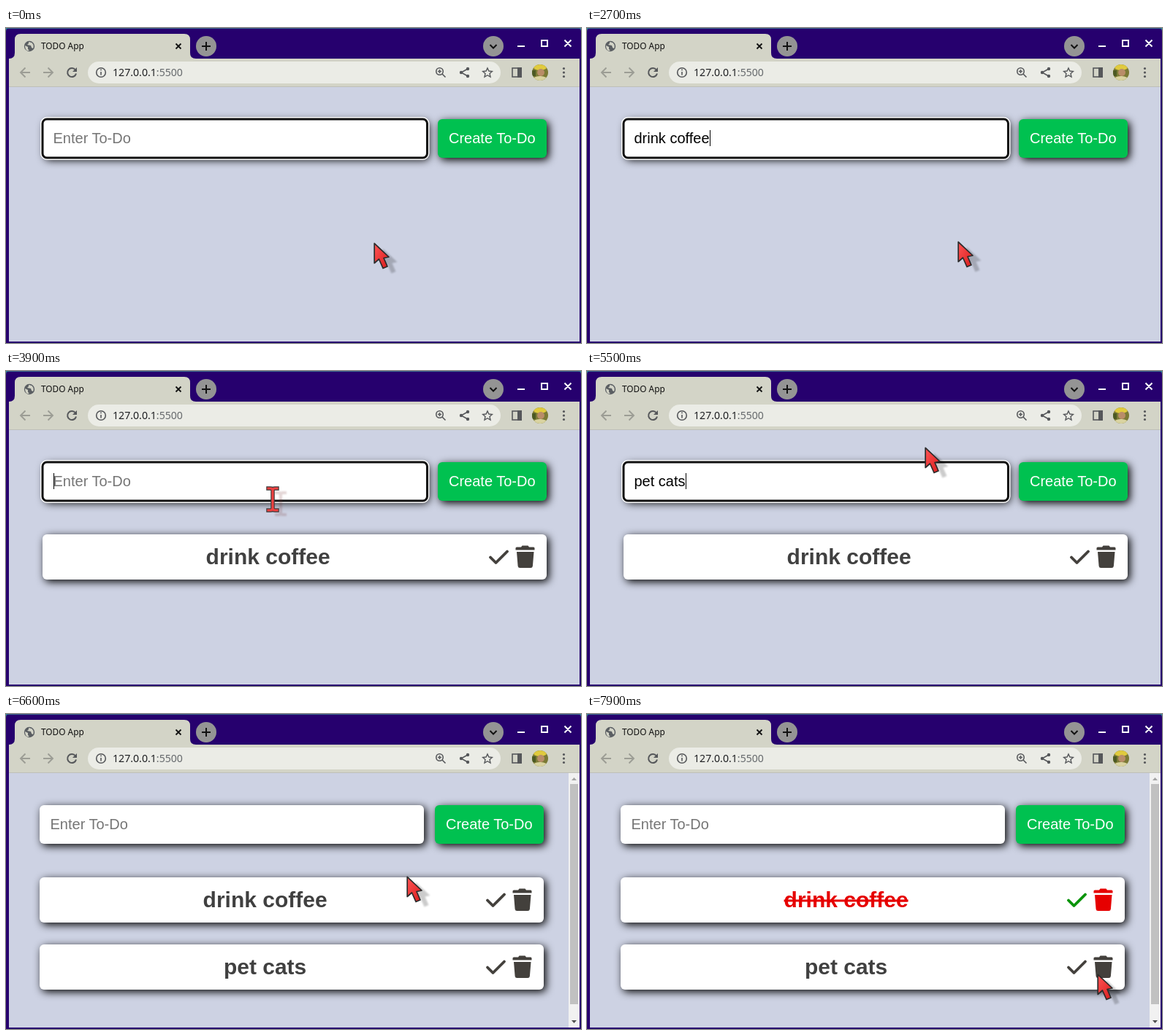
An HTML page that plays this animation: 787x432 px, repeating every 8 s.

```html
<!DOCTYPE html>
<html lang="en">
<head>
<meta charset="utf-8">
<title>TODO App</title>
<style>
  html, body { margin: 0; width: 100%; height: 100%; overflow: hidden; background: #26006e; }
  svg { display: block; width: 787px; height: 432px; }
  text { white-space: pre; }
  .ui { font-family: "Noto Sans", sans-serif; }
  .page { font: 20px "Liberation Sans", Arial, sans-serif; }
  .card { filter: drop-shadow(3px 3px 6px #000); }
  .line { fill: none; stroke: #55575a; stroke-width: 1.6; }
  .item { --text: #404040; --check: #43403c; --trash: #43403c; }
  .item text { font-weight: bold; font-size: 30px; text-anchor: middle; fill: var(--text); }
  .item .check { fill: none; stroke: var(--check); stroke-width: 3.8; stroke-linecap: round; stroke-linejoin: round; }
  .item .trash { fill: var(--trash); }
  .item.done { --text: #e60000; --check: #0a940a; --trash: #e60000; }
  .item.done text { text-decoration: line-through; }
  .shadow { opacity: .2; filter: blur(1px); }
</style>
</head>
<body>
<svg viewBox="0 0 787 432">
  <defs>
    <linearGradient id="red" x2="1" y2="1">
      <stop stop-color="#f55"/><stop offset="1" stop-color="#d81c1c"/>
    </linearGradient>
    <path id="arrowShape" d="M.2 .4V27.500L6.500 22L12 34.500L18 32L13 20.500L20 19Z" stroke-linejoin="round"/>
    <path id="beamShape" d="M-6-15H-3Q0-15 0-12V12Q0 15-3 15H-6M6-15H3Q0-15 0-12V12Q0 15 3 15H6" fill="none" stroke-linecap="square"/>
    <clipPath id="avatar"><circle cx="731" cy="61" r="11"/></clipPath>
  </defs>

  <!-- window frame -->
  <rect width="787" height="432" fill="#26006e"/>
  <path d="M0 .5H787" stroke="#3c6a8c"/>
  <path d="M0 0H5Q0 0 0 5zM787 0H782Q787 0 787 5z" fill="#2a8a9a"/>
  <path d="M4 81V42Q12 42 12 34V16Q12 8 20 8H244Q252 8 252 16V34Q252 42 260 42H785V81Z" fill="#d3d4c7"/>
  <rect x="4" y="80" width="781" height="1" fill="#bfc0b9"/>
  <g class="ui">
    <text x="48" y="29" font-size="11.850" fill="#111">TODO App</text>
    <rect x="112" y="46" width="565" height="30" rx="15" fill="#ebece6"/>
    <text x="146" y="66" font-size="14.130" fill="#202124">127.0.0.1<tspan fill="#666a6d">:5500</tspan></text>
  </g>
  <circle cx="32" cy="25" r="7.2" fill="#5a5e62"/>
  <path d="M26 24L30 26V29L32 31L29 31Q26 29 26 24M31 19V21L29 23L34 24L35 27L37 28Q39 23 35 20Z" fill="#d3d4c7"/>
  <path d="M232.500 21.500l7 7m0-7l-7 7" fill="none" stroke="#111" stroke-width="1.8"/>
  <circle cx="274" cy="25" r="14" fill="#949494"/>
  <circle cx="667" cy="25" r="14" fill="#949494"/>
  <path d="M268 25h12m-6-6v12M662.500 23l4.500 4.500 4.500-4.500" fill="none" stroke="#111" stroke-width="2"/>
  <path d="M700 25h10M733 17h8v8h-8zM764.500 16.500l9 9m0-9l-9 9" fill="none" stroke="#fff" stroke-width="2"/>

  <!-- toolbar icons -->
  <path class="line" d="M33 61H20m6.500-6.500L20 61l6.500 6.500M51 61h13m-6.500-6.500L64 61l-6.500 6.500" style="stroke:#9c9d95;stroke-width:1.9"/>
  <path class="line" d="M95 57.500A6 6 0 1 0 96 62.500" style="stroke-width:2"/>
  <path d="M97 54v6h-6z" fill="#55575a"/>
  <circle class="line" cx="130" cy="61" r="6.300"/>
  <path class="line" d="M130 60v4.500m0-8v1.800"/>
  <circle class="line" cx="593.500" cy="59.500" r="4.700"/>
  <path class="line" d="M597 63l4.500 4.500M591 59.500h5m-2.500-2.500v5"/>
  <path class="line" d="M632 56l-9 5 9 5"/>
  <g fill="#55575a">
    <circle cx="632" cy="56" r="2.200"/><circle cx="623" cy="61" r="2.200"/><circle cx="632" cy="66" r="2.200"/>
    <circle cx="763.500" cy="55.500" r="1.600"/><circle cx="763.500" cy="61" r="1.600"/><circle cx="763.500" cy="66.500" r="1.600"/>
    <path d="M700 54h6v14h-6z"/>
  </g>
  <path class="line" d="M659 55l1.900 4 4.500.5-3.400 3 1 4.500-4-2.300-4 2.300 1-4.500-3.400-3 4.500-.5z" style="stroke-width:1.4"/>
  <rect class="line" x="693" y="55" width="12" height="12"/>
  <g clip-path="url(#avatar)">
    <path d="M719 49h24v24h-24z" fill="#7b7a35"/>
    <ellipse cx="731" cy="54" rx="9" ry="4" fill="#e0ca3e"/>
    <circle cx="732" cy="61" r="5" fill="#b98d68"/>
    <path d="M720 73Q722 65 732 66T743 73z" fill="#d9d3a0"/>
    <path d="M719 58h6v8h-6z" fill="#4c5a24"/>
  </g>

  <!-- page -->
  <rect x="4" y="81" width="781" height="349" fill="#cdd2e3"/>
  <g id="page" class="page">
    <rect class="card" x="50" y="125" width="526" height="53" rx="6" fill="#fff"/>
    <g id="ring" fill="#fff">
      <rect x="50" y="125" width="526.500" height="53" rx="6" stroke="#fff" stroke-width="6"/>
      <rect x="50" y="125" width="526.500" height="53" rx="6" stroke="#101010" stroke-width="3"/>
    </g>
    <text id="field" x="64.500" y="158"></text>
    <rect id="caret" y="140" width="1" height="22"/>
    <rect id="button" class="card" x="591" y="125" width="149" height="53" rx="6"/>
    <text x="606" y="158" fill="#fff">Create To-Do</text>
    <g id="items"></g>
  </g>
  <g id="scrollbar">
    <path d="M770 81h15v349h-15z" fill="#f1f1f1"/>
    <path d="M772 96h11v302h-11z" fill="#c1c1c1"/>
    <path d="M774 91l3.500-4 3.500 4z" fill="#a3a3a3"/>
    <path d="M774 420l3.500 4 3.500-4z" fill="#505050"/>
  </g>

  <!-- pointers -->
  <g id="cursor">
    <g id="arrow">
      <use href="#arrowShape" x="11.500" y="7" class="shadow"/>
      <use href="#arrowShape" fill="url(#red)" stroke="#2b2b2b" stroke-width="1.700"/>
    </g>
    <g id="beam">
      <use href="#beamShape" x="11" y="6" class="shadow" stroke="#733" stroke-width="4"/>
      <use href="#beamShape" stroke="#3a3a3a" stroke-width="5.500"/>
      <use href="#beamShape" stroke="#ee4040" stroke-width="3.200"/>
    </g>
    <g id="hand" stroke="#000" stroke-width="1.500" stroke-linejoin="round">
      <path d="M-2.500 11V1.500Q-.5-1.500 1.500 1.500V7Q5 5.500 6 8Q9 6.500 10 9Q14 8 14 11.500V15.500L12.500 20H-.5L-2.500 17L-6.500 12Q-6.500 8-2.500 11Z" fill="#fff"/>
      <path d="M1.500 7v4M6 8v4M10 9v3" stroke-width="1.200"/>
    </g>
  </g>
</svg>
<script>
const DURATION = 8000, STEP = 100;
const $ = id => document.getElementById(id);
const show = (id, on) => $(id).style.display = on ? "" : "none";

// One time per typed character
const entries = [
  { text: "drink coffee", sent: 3400, y: 0, done: 7700,
    keys: [1100, 1300, 1300, 1500, 1700, 1800, 1900, 2000, 2200, 2300, 2500, 2600] },
  { text: "pet cats", sent: 6200, y: 92, done: Infinity,
    keys: [4500, 4600, 4700, 4800, 5000, 5100, 5200, 5300] }
];
const focusSpans = [[0, 3400], [3600, 6200]];
const caretSpans = [[500, 3100], [3600, 4100], [4500, 5800]];

// Pointer path: time, x, y
const path = [
  [0, 504, 295], [2600, 504, 295], [2700, 508, 293], [2800, 530, 275], [3100, 624, 187],
  [3200, 632, 165], [3300, 634, 163], [3400, 634, 163], [3600, 500, 172], [3700, 425, 175],
  [3900, 365, 176], [4100, 370, 192], [5300, 370, 192], [5500, 463, 105], [5800, 755, 51],
  [6000, 705, 148], [6300, 665, 152], [6600, 549, 223], [6700, 540, 215], [7000, 461, 76],
  [7200, 500, 110], [7500, 658, 236], [7700, 658, 236], [7900, 699, 357], [8000, 699, 357]
];

$("items").innerHTML = entries.map((e, i) => `
  <g id="item${i}" class="item" transform="translate(0 ${e.y})">
    <rect class="card" x="50" y="224" width="690" height="62" rx="6" fill="#fff"/>
    <text x="358.6" y="265">${e.text}</text>
    <path class="check" d="M663 255.500l7.500 7.500L686 247.500"/>
    <path class="trash" d="M699 241.500h6l1.500-2h8l1.500 2h6q1.500 0 1.500 1.500v2.500h-26v-2.500q0-1.500 1.500-1.500zM699 248h23.500l-1.600 19.500q-.3 2.500-2.800 2.500h-14.700q-2.500 0-2.800-2.500z"/>
  </g>`).join("");

const within = (spans, t) => spans.some(([from, to]) => t >= from && t < to);

function pointerAt(t) {
  const i = path.findIndex(p => p[0] > t);
  const [t0, x0, y0] = path[i - 1], [t1, x1, y1] = path[i];
  const k = (t - t0) / (t1 - t0);
  return [x0 + (x1 - x0) * k, y0 + (y1 - y0) * k];
}

function draw(t) {
  const entry = entries.find(e => t < e.sent);
  const typed = entry ? entry.text.slice(0, entry.keys.filter(k => k <= t).length) : "";
  const field = $("field");
  field.textContent = typed || "Enter To-Do";
  field.setAttribute("fill", typed ? "#000" : "#757575");
  show("ring", within(focusSpans, t));
  show("caret", within(caretSpans, t));
  $("caret").setAttribute("x", Math.floor(65 + (typed ? field.getComputedTextLength() : 0)));

  entries.forEach((e, i) => {
    show("item" + i, t >= e.sent);
    $("item" + i).classList.toggle("done", t >= e.done);
  });
  const scrolling = t >= entries[1].sent;
  show("scrollbar", scrolling);
  $("page").setAttribute("transform", `translate(${scrolling ? -4 : 0} 0)`);

  const [x, y] = pointerAt(t);
  const inRow = y > 125 && y < 178;
  const overField = inRow && x > 50 && x < 576;
  const overButton = inRow && x > 591 && x < 740;
  $("cursor").setAttribute("transform", `translate(${x} ${y})`);
  show("beam", overField);
  show("hand", overButton);
  show("arrow", !overField && !overButton);
  $("button").setAttribute("fill", overButton ? "#089c40" : "#00c150");
}

const start = performance.now();
function frame() {
  const t = (performance.now() - start) % DURATION;
  draw(Math.floor(t / STEP) * STEP);
  requestAnimationFrame(frame);
}
frame();
</script>
</body>
</html>
```
